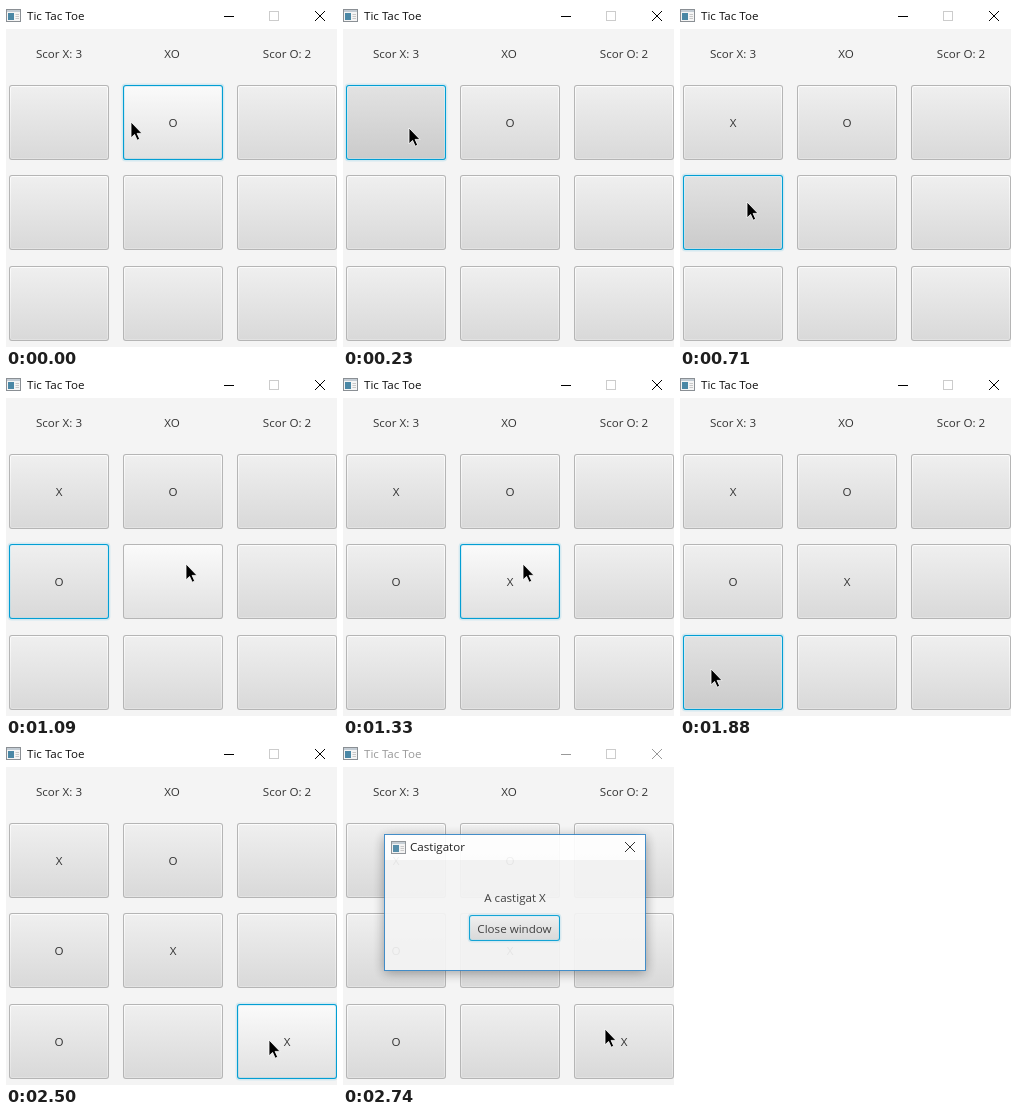
Write an HTML page that moves like this. It is 331 px wide and 341 px high and loops after 2800 ms.

```html
<!DOCTYPE html>
<html lang="ro">
<head>
<meta charset="utf-8">
<title>Tic Tac Toe</title>
<style>
html, body { margin: 0; width: 100%; height: 100%; overflow: hidden; background: #f4f4f4; }
svg { display: block; }
text { font: 11.6px "Open Sans", "Noto Sans", sans-serif; fill: #333; }
.mid { text-anchor: middle; }
.bar { fill: #000; stroke: #000; }
.bar text, .caption { fill: #111; stroke: none; }
.idle .bar { fill: #999; stroke: #999; }
.idle .bar text { fill: #999; }
.focus { display: none; }
.on .focus { display: inline; }
.edge { fill: #b5b5b5; }
.on .edge { fill: #039ed3; }
</style>
</head>
<body>
<svg id="stage" width="331" height="341" viewBox="0 0 331 341">
  <defs>
    <filter id="blur" x="-20%" y="-20%" width="140%" height="140%"><feGaussianBlur stdDeviation="6"/></filter>
    <g id="icon">
      <rect x=".5" y=".5" width="14" height="12" fill="#f5f5f5" stroke="#8a8f94"/>
      <rect x="1" y="1" width="13" height="2" fill="#c3ccd4"/>
      <rect x="2" y="4" width="6" height="7" fill="#4a87a5"/>
      <path d="M9.5 5.5h3.5m-3.5 2h3.5m-3.5 2h3.5" stroke="#c8c8c8"/>
    </g>
  </defs>

  <rect width="331" height="341" fill="#f4f4f4"/>
  <rect width="331" height="23" fill="#fff"/>
  <use href="#icon" y="3"/>
  <g class="bar">
    <text x="21" y="14">Tic Tac Toe</text>
    <path d="M218 10.5h10M309 5l10 10m0-10l-10 10" fill="none"/>
  </g>
  <rect x="263.5" y="5.5" width="9" height="9" fill="none" stroke="#ccc"/>
  <text class="mid" x="53" y="52">Scor X: 3</text>
  <text class="mid" x="166" y="52">XO</text>
  <text class="mid" x="281" y="52">Scor O: 2</text>
  <g id="board"></g>

  <g id="dialog">
    <rect x="41" y="93" width="262" height="136" opacity=".38" filter="url(#blur)"/>
    <rect x="41.5" y="90.5" width="261" height="136" fill="#f4f4f4"/>
    <rect x="42" y="91" width="260" height="25" fill="#fff"/>
    <rect x="41.5" y="90.5" width="261" height="136" fill="none" stroke="#3586c6"/>
    <use href="#icon" x="48" y="97"/>
    <text class="caption" x="67" y="107">Castigator</text>
    <path d="M282 98l10 10m0-10l-10 10" stroke="#222"/>
    <text class="mid" x="172" y="158">A castigat X</text>
  </g>

  <path id="cursor" d="M0 0v15.8l3.6-3.4 2.6 5.8 2.5-1.1-2.6-5.7h4.9z" stroke="#fff" stroke-width=".8"/>
</svg>
<script>
const LOOP = 2800;
const $ = id => document.getElementById(id);

function add(parent, tag, attrs) {
  const el = document.createElementNS("http://www.w3.org/2000/svg", tag);
  for (const key in attrs) el.setAttribute(key, attrs[key]);
  return parent.appendChild(el);
}

function gradient(id, top, bottom) {
  const fill = add(document.querySelector("defs"), "linearGradient", { id, x2: 0, y2: 1 });
  add(fill, "stop", { "stop-color": top });
  add(fill, "stop", { "stop-color": bottom, offset: 1 });
}
gradient("normal", "#efefef", "#d9d9d9");
gradient("hover", "#fafafa", "#e1e1e1");
gradient("press", "#e2e2e2", "#cbcbcb");
gradient("rim", "#fcfcfc", "#e2e2e2");

function makeButton(parent, x, y, w, h) {
  const group = add(parent, "g", {});
  const layer = (inset, rx, attrs) => add(group, "rect", {
    x: x + inset, y: y + inset, width: w - 2 * inset, height: h - 2 * inset, rx, ...attrs
  });
  layer(0, 3, { class: "edge" });
  layer(1, 2, { fill: "url(#rim)" });
  layer(-1.4, 4, { class: "focus", fill: "#039ed3", "fill-opacity": .133 });
  const body = layer(2, 1, { fill: "url(#normal)" });
  const label = add(group, "text", { class: "mid", x: x + w / 2, y: y + h / 2 + 4.5 });
  const hit = (px, py) => px >= x && px <= x + w && py >= y && py <= y + h;
  return { group, body, label, hit };
}

const cells = [];
for (const y of [79, 169, 260])
  for (const x of [3, 117, 231]) cells.push(makeButton($("board"), x, y, 100, 75));

const closer = makeButton($("dialog"), 126, 171, 91, 26);
closer.group.setAttribute("class", "on");
closer.label.textContent = "Close window";

// Each turn: the cursor leaves, arrives at x, y, presses and releases.
const turn = (cell, x, y, leave, arrive, press, release) => ({ cell, x, y, leave, arrive, press, release });
const turns = [
  turn(1, 125, 116, -9, -9, -9, -9),
  turn(0, 66, 122, 80, 230, 230, 400),
  turn(3, 67, 196, 470, 630, 710, 860),
  turn(4, 180, 189, 940, 1090, 1240, 1330),
  turn(6, 31, 294, 1560, 1730, 1880, 1960),
  turn(8, 263, 296, 2030, 2190, 2420, 2500),
  turn(-1, 262, 285, 2580, 2740, LOOP, LOOP)
];
const hops = [.3, .8, 1];
const fades = [.3, .7, .92];

const hopAt = (t, m) => Math.min(2, Math.floor(2 * (t - m.leave) / (m.arrive - m.leave)));

function show(t) {
  const n = turns.findLastIndex(m => m.leave <= t);
  const now = turns[n], from = turns[n - 1] || now;
  const hop = n ? hopAt(t, now) : 2;
  const x = from.x + (now.x - from.x) * hops[hop];
  const y = from.y + (now.y - from.y) * hops[hop];
  const modal = now.cell < 0;
  const focused = modal ? -1 : turns.findLast(m => m.press <= t).cell;
  const pressed = t >= now.press && t < now.release;
  // The centre keeps its hover look until the next press.
  const lingers = now.cell === 6 && t < now.press;

  cells.forEach((cell, i) => {
    const over = !modal && (cell.hit(x, y) || lingers && i === 4);
    const look = !over ? "normal" : pressed ? "press" : "hover";
    const move = turns.findIndex(m => m.cell === i && m.release <= t);
    cell.body.setAttribute("fill", `url(#${look})`);
    cell.group.setAttribute("class", i === focused ? "on" : "");
    cell.label.textContent = move < 0 ? "" : "OX"[move % 2];
  });
  $("dialog").setAttribute("opacity", modal ? fades[hop] : 0);
  $("stage").setAttribute("class", modal ? "idle" : "");
  $("cursor").setAttribute("transform", `translate(${Math.round(x)} ${Math.round(y)})`);
}

const start = performance.now();
function tick() {
  show((performance.now() - start) % LOOP);
  requestAnimationFrame(tick);
}
tick();
</script>
</body>
</html>
```
